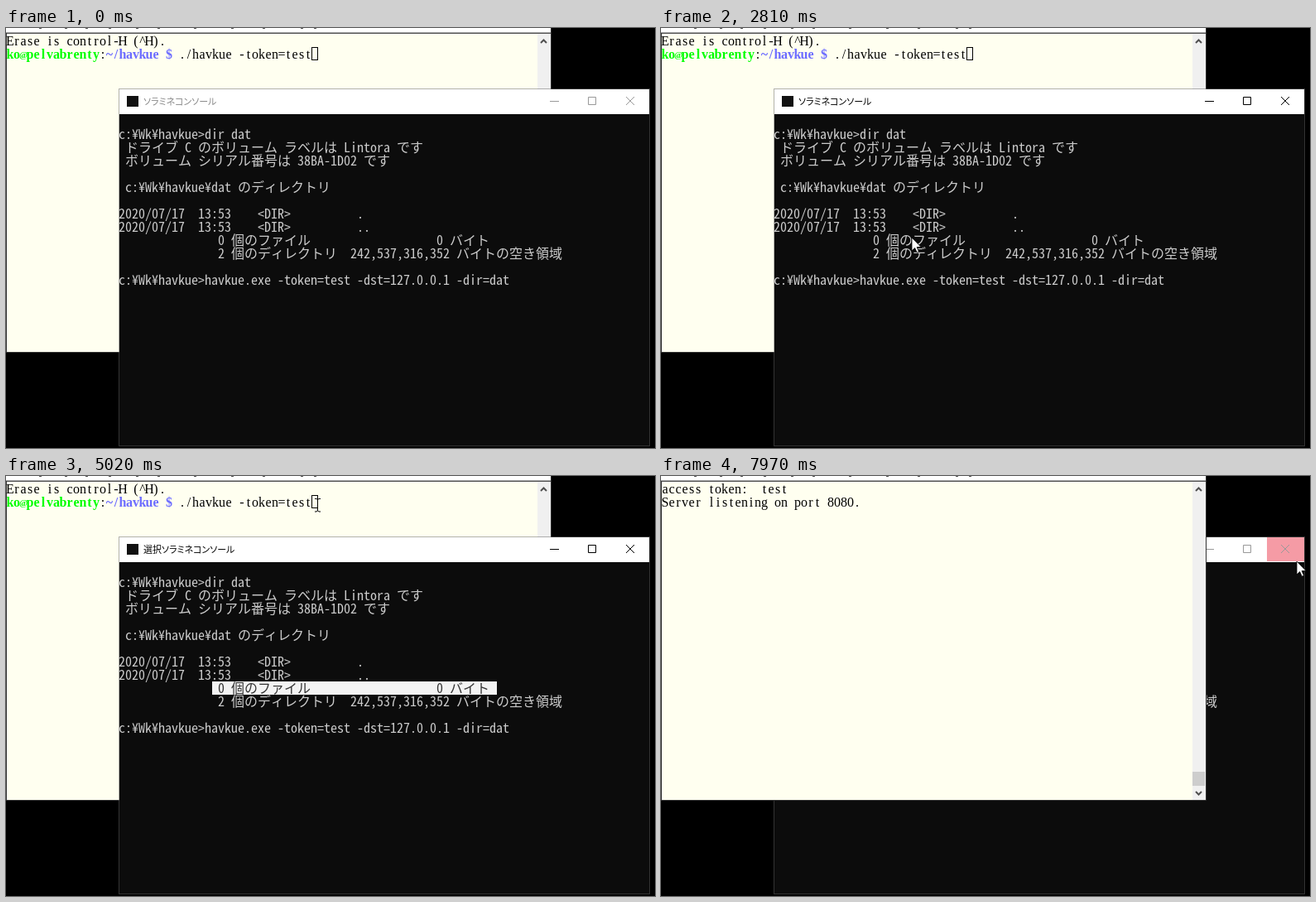
An HTML page that plays this animation: 784 by 507 pixels, repeating every 8 s.

```html
<!DOCTYPE html>
<html lang="ja">
<head>
<meta charset="utf-8">
<style>
html, body { margin: 0; width: 100%; height: 100%; overflow: hidden; background: #000; }
svg { display: block; width: 784px; height: 507px; }
text { white-space: pre; }
.cell { text-anchor: middle; font-size: 16px; }
.sans { font-family: 'Noto Sans Mono CJK JP', 'Noto Sans CJK JP', 'Noto Sans CJK', monospace; font-weight: 300; fill: #ccc; }
.serif { font-family: 'Liberation Serif', 'Noto Serif', serif; }
.bold { font-weight: bold; }
.title { font: 11px 'Noto Sans CJK JP', 'Noto Sans CJK', sans-serif; font-feature-settings: 'palt'; }
#sel { mix-blend-mode: difference; }
</style>
</head>
<body>
<svg id="stage" viewBox="0 0 784 507" xmlns="http://www.w3.org/2000/svg">
  <rect width="784" height="507"/>
  <g id="term">
    <rect width="659" height="391" fill="#fffff0"/>
    <rect width="659" height="5" fill="#fff"/>
    <g id="ticks" fill="#555"></g>
    <rect y="5" width="659" height="1" fill="#a0a0a0"/>
    <rect y="6" width="659" height="1" fill="#555"/>
    <rect x="642" y="7" width="16" height="384" fill="#f0f0f0"/>
    <rect x="642" y="357" width="15" height="17" fill="#cdcdcd"/>
    <path d="M646 18l3.5-3.5 3.5 3.5M646 381l3.5 3.5 3.5-3.5" fill="none" stroke="#505050" stroke-width="2"/>
    <path d="M.5 6V391.5H658.5V0" fill="none" stroke="#333"/>
    <g id="prompt"></g>
    <g id="output"></g>
    <rect id="caret" width="7" height="15" stroke="#000"/>
  </g>
  <g id="con" style="isolation:isolate">
    <rect x="136.5" y="73.5" width="641" height="431" fill="none" stroke="#666" stroke-opacity=".5"/>
    <rect x="137" y="74" width="640" height="430" fill="#0c0c0c"/>
    <rect x="137" y="74" width="640" height="30" fill="#fff"/>
    <rect x="146" y="82" width="14" height="13" fill="#111"/>
    <text id="title" class="title" x="166" y="92.5"></text>
    <rect id="hover" x="732" y="74" width="45" height="29" fill="#f59ba5"/>
    <path id="buttons" d="M657 88.5h11M703.5 83.5h9v9h-9zM749 83l10 10M759 83l-10 10" fill="none"/>
    <g id="lines"></g>
    <rect id="sel" x="249" y="248" height="16" fill="#fff"/>
  </g>
  <g id="mouse">
    <circle id="click" r="12" fill="#fff000"/>
    <path id="arrow" d="M0 0V16L3.7 12.5 6.2 18.2 8.6 17.2 6.1 11.6H11.2Z" fill="#fff" stroke="#000" stroke-width=".8"/>
    <path id="beam" d="M-3 -7.5H-1L.5 -6.5 2 -7.5H4M.5 -6.5V7M-3 8H-1L.5 7 2 8H4" fill="none" stroke="#000"/>
  </g>
</svg>
<script>
const NS = 'http://www.w3.org/2000/svg';
const $ = id => document.getElementById(id);
const CELL = 8, ROW = 16, LOOP = 8000;

function add(parent, tag, attrs) {
  const el = document.createElementNS(NS, tag);
  for (const k in attrs) el.setAttribute(k, attrs[k]);
  return parent.appendChild(el);
}

// Places each character in its terminal cell; returns the next x.
function type(parent, x, y, str, attrs) {
  const xs = [];
  for (const ch of str) {
    const w = ch.charCodeAt(0) > 0x2fff ? 2 * CELL : CELL;
    xs.push(x + w / 2);
    x += w;
  }
  add(parent, 'text', { x: xs.join(' '), y, ...attrs }).textContent = str;
  return x;
}

const sans = { class: 'cell sans' };
const serif = { class: 'cell serif' };
const bold = (fill, size = 16) => ({ class: 'cell serif bold', fill, style: `font-size:${size}px` });

const stamp = '2020/07/17  13:53    <DIR>          ';
[
  '',
  'c:¥Wk¥havkue>dir dat',
  ' ドライブ C のボリューム ラベルは Lintora です',
  ' ボリューム シリアル番号は 38BA-1D02 です',
  '',
  ' c:¥Wk¥havkue¥dat のディレクトリ',
  '',
  stamp + '.',
  stamp + '..',
  ' '.repeat(15) + '0 個のファイル' + ' '.repeat(19) + '0 バイト',
  ' '.repeat(15) + '2 個のディレクトリ  242,537,316,352 バイトの空き領域',
  '',
  'c:¥Wk¥havkue>havkue.exe -token=test -dst=127.0.0.1 -dir=dat'
].forEach((s, i) => s && type($('lines'), 136, 118 + ROW * i, s, sans));

const prompt = $('prompt'), output = $('output');
type(prompt, 1, 21, 'Erase is control-H (^H).', serif);
let px = type(prompt, 1, 37, 'ko', bold('#0f0'));
px = type(prompt, px, 36, '@', bold('#0f0', 11));
px = type(prompt, px, 37, 'pelvabrenty', bold('#0f0'));
px = type(prompt, px, 37, ':', serif);
px = type(prompt, px, 37, '~/havkue $', bold('#6c6cff'));
type(prompt, px, 37, ' ./havkue -token=test', serif);
type(output, 1, 21, 'access token:  test', serif);
type(output, 1, 37, 'Server listening on port 8080.', serif);

for (const x of [40, 71, 96, 124, 157, 183, 227, 272, 310, 356, 372])
  add($('ticks'), 'rect', { x, y: 0, width: 3, height: 1 });

// Pointer moves: start, end, steps, target x, y
const moves = [
  [380, 1160, 11, 273, 259],
  [1230, 1300, 2, 266, 258],
  [1570, 1640, 2, 261, 255],
  [1890, 1970, 2, 258, 255],
  [2420, 2590, 3, 327, 252],
  [2810, 2970, 3, 255, 254],
  [3350, 3590, 4, 405, 256],
  [3670, 3990, 5, 573, 260],
  [4090, 4170, 2, 586, 254],
  [4700, 5020, 5, 376, 35],
  [5335, 5820, 7, 517, 55],
  [7650, 7730, 2, 600, 60],
  [7810, 7890, 2, 771, 124],
  [7970, 7970, 1, 768, 103]
];

function pointer(t) {
  let x = 685, y = 520;
  for (const [a, b, n, tx, ty] of moves) {
    if (t < a) break;
    const k = n > 1 ? Math.min(n, Math.floor((t - a) / (b - a) * (n - 1) + 1.001)) : 1;
    const p = k / n;
    x += (tx - x) * p;
    y += (ty - y) * p;
  }
  return [x, y];
}

const show = (id, on) => $(id).setAttribute('visibility', on ? 'visible' : 'hidden');
const set = (id, attrs) => { for (const k in attrs) $(id).setAttribute(k, attrs[k]); };
const within = (t, a, b) => t >= a && t < b;

function draw(t) {
  const front = t >= 5250;
  const active = within(t, 2270, 5250);
  const selecting = t >= 3270;
  const [top, under] = front ? ['term', 'con'] : ['con', 'term'];
  if ($(under).nextElementSibling !== $(top)) $('stage').insertBefore($(under), $(top));

  $('title').textContent = (selecting ? '選択' : '') + 'ソラミネコンソール';
  set('title', { fill: active ? '#000' : '#888' });
  set('buttons', { stroke: active ? '#000' : '#999' });
  show('hover', t >= 7970);

  const [x, y] = pointer(t);
  const end = Math.floor((pointer(Math.min(t, 4400))[0] - 137) / CELL) + 1;
  set('sel', { width: selecting ? Math.max(CELL, 137 + end * CELL - 249) : 0 });

  show('prompt', t < 6250);
  show('output', t >= 6320);
  show('caret', t < 6250);
  const entered = t >= 5900;
  set('caret', {
    x: entered ? 1.5 : 369.5,
    y: entered ? 39.5 : 23.5,
    fill: t >= 5335 ? '#000' : 'none'
  });

  const shown = t >= 380;
  const beam = shown && x < 642 && y < 73;
  set('mouse', { transform: `translate(${Math.round(x)} ${Math.round(y)})` });
  show('arrow', shown && !beam);
  show('beam', beam);
  show('click', within(t, 2270, 2810) || within(t, 3270, 4400) || within(t, 5250, 5335));
  set('click', { opacity: front ? 0.5 : 0.75 });
}

const start = performance.now();
function tick() {
  draw((performance.now() - start) % LOOP);
  requestAnimationFrame(tick);
}
tick();
</script>
</body>
</html>
```
